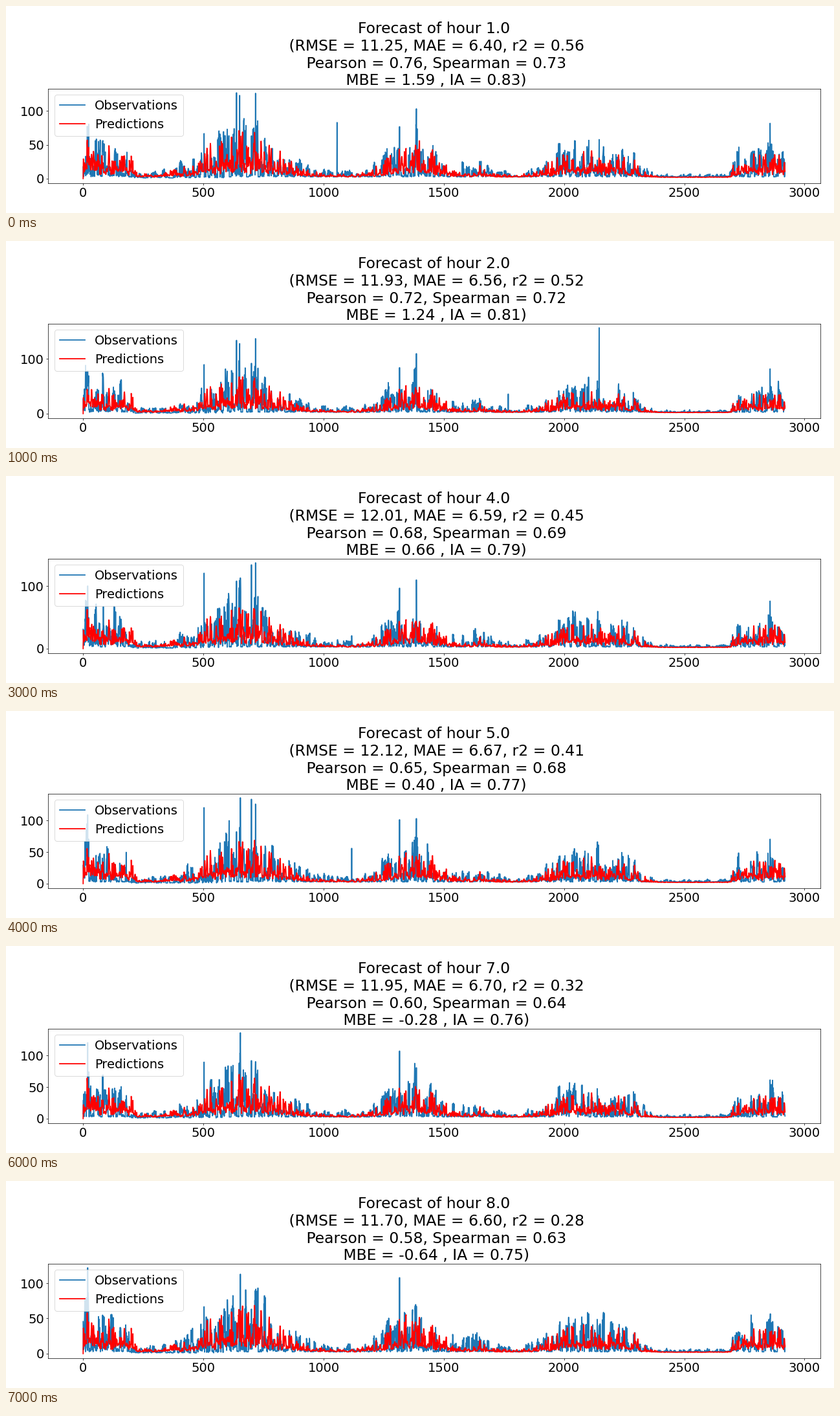
Recreate the animation shown at these times as a matplotlib script. Size 1280 by 320 pixels, loop 8000 ms.

```python
import numpy as np
import matplotlib.pyplot as plt
from matplotlib.animation import FuncAnimation

plt.rcParams.update({"font.family": "DejaVu Sans", "font.size": 22})

W, H, DPI = 1280, 320, 64
N, PER_DAY = 2920, 8
DAYS = N // PER_DAY
t = np.arange(N)
day = t // PER_DAY

# One row per hour: RMSE, MAE, r2, Pearson, Spearman, MBE, IA
STATS = [
    (11.25, 6.40, 0.56, 0.76, 0.73, 1.59, 0.83),
    (11.93, 6.56, 0.52, 0.72, 0.72, 1.24, 0.81),
    (11.87, 6.51, 0.49, 0.70, 0.70, 0.92, 0.80),
    (12.01, 6.59, 0.45, 0.68, 0.69, 0.66, 0.79),
    (12.12, 6.67, 0.41, 0.65, 0.68, 0.40, 0.77),
    (12.15, 6.76, 0.36, 0.62, 0.65, 0.09, 0.76),
    (11.95, 6.70, 0.32, 0.60, 0.64, -0.28, 0.76),
    (11.70, 6.60, 0.28, 0.58, 0.63, -0.64, 0.75),
]

# Busy seasons: centre, width, steepness, observed ceiling, predicted ceiling
SEASONS = [
    (100, 115, 8, 62, 40),
    (15, 25, 2, 35, 35),
    (660, 185, 2, 100, 74),
    (1370, 125, 2, 82, 60),
    (1640, 55, 2, 20, 12),
    (2120, 200, 4, 55, 36),
    (2815, 112, 8, 50, 33),
]

# Outstanding events: time, height, hour of the peak, fade in hours
EVENTS = [
    (19, 122, 8, 9),
    (503, 122, 4.5, 4.5),
    (638, 134, 2, 4.3),
    (651, 128, 2, 5),
    (654, 145, 6, 4),
    (700, 136, 4.5, 4),
    (717, 141, 3, 6),
    (1056, 83, 1, 0.7),
    (1117, 56, 5, 1),
    (1316, 108, 8, 12),
    (1386, 112, 3, 7),
    (1768, 46, 2.6, 1.2),
    (2146, 157, 2, 1),
    (2604, 46, 3, 0.6),
    (2857, 82, 1.5, 9),
]


def bell(x, centre, width, power=2):
    return np.exp(-np.abs((x - centre) / width) ** power)


dry = (t > 2345) & (t < 2700)
obs_top = np.where(dry, 5.0, 13.0)
pred_top = np.where(dry, 1.0, 5.0)
for centre, width, power, obs_max, pred_max in SEASONS:
    shape = bell(t, centre, width, power)
    obs_top += obs_max * shape
    pred_top += pred_max * shape
obs_floor = np.where((t > 200) & (t < 600), 1.0, 2.5)

shared = np.random.default_rng(11)
obs_days = shared.normal(size=DAYS)
pred_days = shared.normal(size=DAYS)
phase = shared.uniform(0, np.pi, DAYS)[day]
trough = shared.uniform(0.4, 1.5, DAYS)[day]
pulse = np.sin(np.pi * t / PER_DAY + phase) ** 2


def daily(common, rng, share):
    """Daily strength from 0 to 1, partly shared by all hours."""
    mix = np.sqrt(share) * common + np.sqrt(1 - share) * rng.normal(size=DAYS)
    return (0.5 + 0.5 * np.tanh(0.8 * mix))[day]


def observations(hour, rng):
    strength = daily(obs_days, rng, 0.75) ** 1.6
    y = obs_floor + obs_top * strength * rng.random(N)
    for x, height, peak_hour, fade in EVENTS:
        y[x] = max(y[x], height * bell(hour, peak_hour, fade))
    return y


def predictions(rng):
    strength = daily(pred_days, rng, 0.95) ** 1.5
    base = 1.8 + 0.18 * pred_top * trough * rng.uniform(0.8, 1.2, N)
    y = base + 0.85 * pred_top * strength * pulse
    y[0] = 0
    return y


def make_series(hour):
    rng = np.random.default_rng(100 + hour)
    return observations(hour, rng), predictions(rng)


series = [make_series(i + 1) for i in range(len(STATS))]

fig, ax = plt.subplots(figsize=(W / DPI, H / DPI), dpi=DPI)
fig.subplots_adjust(left=65 / W, right=1258.5 / W,
                    bottom=1 - 273.5 / H, top=1 - 127.5 / H)
obs_line, = ax.plot(t, series[0][0], lw=2, label="Observations")
pred_line, = ax.plot(t, series[0][1], "r", lw=2, label="Predictions")
ax.legend(loc="upper left")


def draw(i):
    rmse, mae, r2, pearson, spearman, mbe, ia = STATS[i]
    obs, pred = series[i]
    obs_line.set_ydata(obs)
    pred_line.set_ydata(pred)
    ax.relim()
    ax.autoscale_view()
    ax.set_title(
        f"Forecast of hour {i + 1:.1f}\n"
        f" (RMSE = {rmse:.2f}, MAE = {mae:.2f}, r2 = {r2:.2f}\n"
        f" Pearson = {pearson:.2f}, Spearman = {spearman:.2f}\n"
        f" MBE = {mbe:.2f} , IA = {ia:.2f})"
    )
    return obs_line, pred_line


anim = FuncAnimation(fig, draw, frames=len(STATS), interval=1000,
                     repeat=True, repeat_delay=0, blit=False)
plt.show()
```
